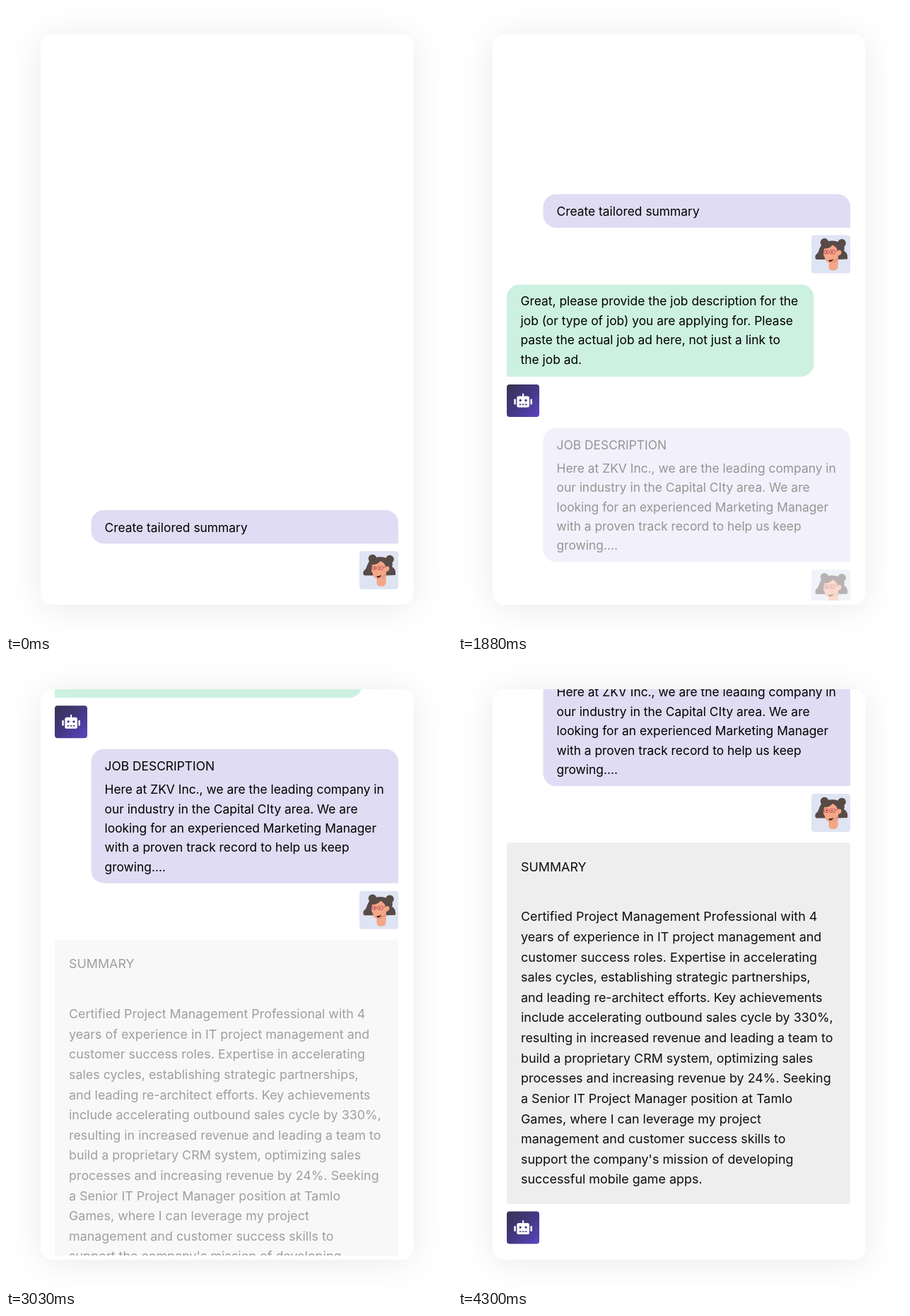
Write an HTML page with a canvas that moves like this. It is 631x888 px and loops after 4.33 s.

```html
<!DOCTYPE html>
<html lang="en">
<head>
<meta charset="utf-8">
<title>Tailored summary chat</title>
<style>
  html, body { margin: 0; width: 100%; height: 100%; overflow: hidden; background: #fff; }
  canvas { display: block; width: 631px; height: 888px; }
</style>
</head>
<body>
<canvas id="stage" width="631" height="888"></canvas>
<script>
const ctx = document.getElementById('stage').getContext('2d');
const LOOP = 4330;
const CARD = { x: 49, y: 40, w: 527.5, h: 808 };
const CHAT_FONT = '400 17.4px Inter, sans-serif';
const SUMMARY_FONT = '400 17.9px Inter, sans-serif';
const LILAC = '#e0dcf3', MINT = '#cdf1e1';

const question = [
  'Great, please provide the job description for the',
  'job (or type of job) you are applying for. Please',
  'paste the actual job ad here, not just a link to',
  'the job ad.'
];
const jobAd = [
  'Here at ZKV Inc., we are the leading company in',
  'our industry in the Capital CIty area. We are',
  'looking for an experienced Marketing Manager',
  'with a proven track record to help us keep',
  'growing....'
];
const summary = [
  'Certified Project Management Professional with 4',
  'years of experience in IT project management and',
  'customer success roles. Expertise in accelerating',
  'sales cycles, establishing strategic partnerships,',
  'and leading re-architect efforts. Key achievements',
  'include accelerating outbound sales cycle by 330%,',
  'resulting in increased revenue and leading a team to',
  'build a proprietary CRM system, optimizing sales',
  'processes and increasing revenue by 24%. Seeking',
  'a Senior IT Project Manager position at Tamlo',
  'Games, where I can leverage my project',
  'management and customer success skills to',
  "support the company's mission of developing",
  'successful mobile game apps.'
];

// Each later message scrolls the chat and fades in.
const START_Y = 714;
const scrolls = [
  { at: 551, dur: 500, dist: 203.5 },
  { at: 1672, dur: 500, dist: 270.5 },
  { at: 2817, dur: 750, dist: 584 }
];

const clamp = v => Math.max(0, Math.min(1, v));
const progress = (t, at, dur) => clamp((t - at) / dur);
const easeOut = p => 1 - Math.pow(1 - p, 4.3);

function box(x, y, w, h, radius, fill) {
  ctx.fillStyle = fill;
  ctx.beginPath();
  ctx.roundRect(x, y, w, h, radius);
  ctx.fill();
}

function disc(x, y, rx, ry, fill) {
  ctx.fillStyle = fill;
  ctx.beginPath();
  ctx.ellipse(x, y, rx, ry, 0, 0, Math.PI * 2);
  ctx.fill();
}

function shape(path, fill) {
  ctx.fillStyle = fill;
  ctx.fill(new Path2D(path));
}

function text(lines, x, y, pitch, font, color) {
  ctx.font = font;
  ctx.fillStyle = color;
  lines.forEach((line, i) => ctx.fillText(line, x, y + i * pitch));
}

const chatText = (lines, x, y) => text(lines, x, y, 27.4, CHAT_FONT, '#000');
const summaryText = (lines, y) => text(lines, 89, y, 28.62, SUMMARY_FONT, '#0d0d0f');

function at(x, y, draw) {
  ctx.save();
  ctx.translate(x, y);
  draw();
  ctx.restore();
}

function userIcon(y) {
  at(500, y, () => {
    box(0, 0, 55, 54, 4, '#dfe4f3');
    const hair = '#574a47', skin = '#f4a787';
    disc(18.5, 10.5, 5.8, 5.8, hair);
    disc(43, 11.5, 5.8, 5.8, hair);
    shape('M14 14 Q28 3 45 13 Q48 18 46 22 Q52 25 51 34 L37 34.5 L8 34.5 Q4 34 6 28 Q10 25 11 20 Z', hair);
    shape('M18 19 Q25 20 30 14 Q36 17 37 22 Q42 20 42.5 24.5 Q42 28.5 38 29 L37.5 46 Q36 50 31 50 Q25 50 24.5 46 L24.5 39 Q19 38 19 32 L17 28 Z', skin);
    shape('M25 37 Q33 37 37.5 31 L37.5 35 Q31 40 24.5 39 Z', '#e5957a');
    ctx.strokeStyle = '#d9606a';
    ctx.lineWidth = 1.1;
    ctx.beginPath();
    ctx.roundRect(18, 21.5, 6, 5, 2);
    ctx.roundRect(26, 21, 7, 5.5, 2);
    ctx.moveTo(33, 23);
    ctx.lineTo(38, 22);
    ctx.stroke();
    disc(21.5, 24, 0.9, 0.9, '#2b2223');
    disc(29, 23.8, 0.9, 0.9, '#2b2223');
    shape('M24 35.5 Q28 36 31 33.8 Q29.5 38 25.5 37.5 Z', '#30191d');
  });
}

function botIcon(y) {
  at(69, y, () => {
    const g = ctx.createLinearGradient(0, 0, 46, 46);
    g.addColorStop(0, '#37344f');
    g.addColorStop(0.5, '#443783');
    g.addColorStop(1, '#5d45c2');
    box(0, 0, 46, 46, 4, g);
    box(14.3, 16.5, 17.6, 16, 2.6, '#fff');
    box(22.1, 12.5, 2, 5, 1, '#fff');
    box(10.3, 20.5, 2.5, 8, 1.2, '#fff');
    box(33.4, 20.5, 2.5, 8, 1.2, '#fff');
    for (const x of [19.2, 27]) disc(x, 22.6, 1.7, 1.7, '#44377f');
    for (const x of [17.7, 21.8, 25.9]) box(x, 27.7, 2.6, 1.6, 0, '#44377f');
  });
}

const userBubble = (y, h) => box(120.5, y, 434.5, h, [18, 18, 0, 18], LILAC);

function veil(y, h, opacity) {
  if (opacity >= 1) return;
  ctx.fillStyle = `rgba(255,255,255,${1 - opacity})`;
  ctx.fillRect(60, y, 505, h);
}

function drawChat(t) {
  const [fade2, fade3] = scrolls.map(s => progress(t, s.at, s.dur));
  const fade4 = progress(t, 2650, 960);

  userBubble(0, 47.5);
  chatText(['Create tailored summary'], 139.5, 30.6);
  userIcon(58);

  box(69, 128, 434.5, 130.5, [18, 18, 18, 0], MINT);
  chatText(question, 88.5, 158);
  botIcon(269.5);
  veil(126, 191, fade2);

  userBubble(331, 190);
  chatText(['JOB DESCRIPTION'], 139.5, 361.2);
  chatText(jobAd, 139.5, 394.4);
  userIcon(532);
  veil(329, 259, fade3);

  box(69, 601, 486, 512, 4, '#eeeeee');
  summaryText(['SUMMARY'], 641.7);
  summaryText(summary, 712.3);
  botIcon(1123.5);
  veil(599, 573, fade4);
}

function drawCard() {
  ctx.fillStyle = '#fff';
  ctx.fillRect(0, 0, 631, 888);
  ctx.save();
  ctx.shadowColor = 'rgba(0,0,0,0.085)';
  ctx.shadowBlur = 50;
  ctx.shadowOffsetY = 4;
  box(CARD.x, CARD.y, CARD.w, CARD.h, 16, '#fff');
  ctx.restore();
}

function render(now) {
  const t = now % LOOP;
  const y = scrolls.reduce((pos, s) => pos - s.dist * easeOut(progress(t, s.at, s.dur)), START_Y);

  drawCard();
  ctx.save();
  ctx.beginPath();
  ctx.rect(CARD.x, CARD.y, CARD.w, 802);
  ctx.clip();
  ctx.translate(0, y);
  drawChat(t);
  ctx.restore();
}

const start = performance.now();
function tick() {
  render(performance.now() - start);
  requestAnimationFrame(tick);
}
tick();
</script>
</body>
</html>
```
